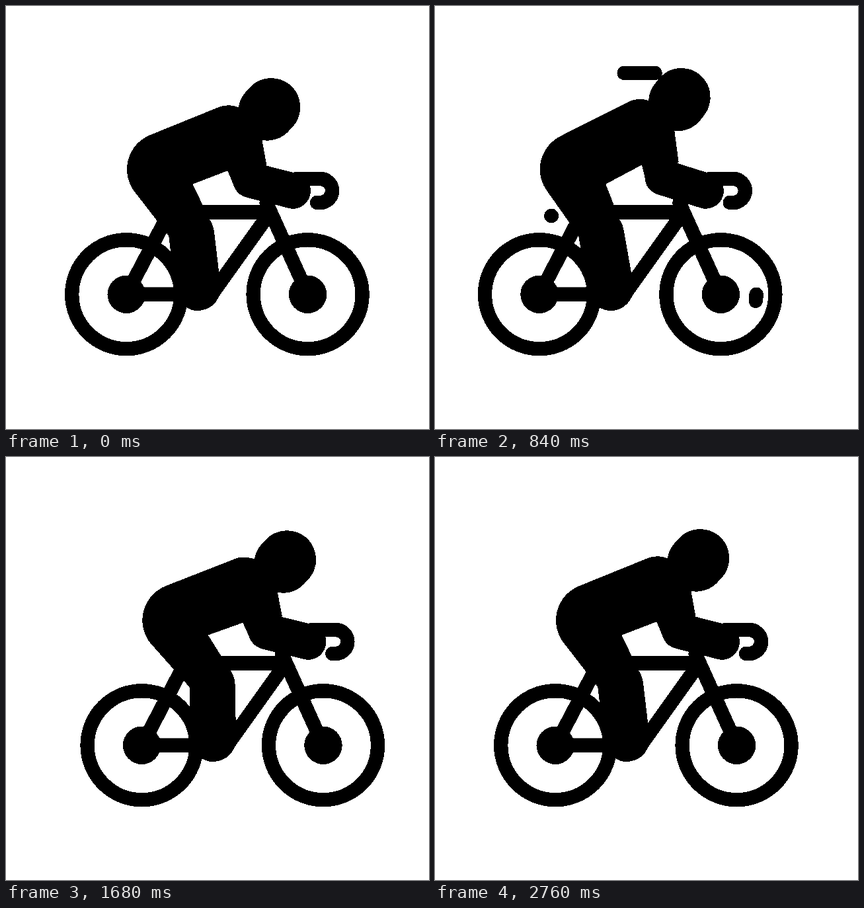
Animation of 640 by 640 pixels, one loop 3 s. Source, as an HTML page with a canvas:

```html
<!DOCTYPE html>
<html lang="en">
<head>
<meta charset="utf-8">
<title>Cyclist</title>
<style>
html, body { margin: 0; width: 100%; height: 100%; overflow: hidden; background: #fff; }
canvas { display: block; filter: contrast(40); } /* hard edges */
</style>
</head>
<body>
<canvas id="stage" width="640" height="640"></canvas>
<script>
const ctx = document.getElementById('stage').getContext('2d');
const LOOP = 3000, STEP = 40, SWEEP = 400, BAR = 21.4;
const REAR = [182.2, 436.2], FRONT = [456.6, 436.2], HIP = [239, 247], HAND = [434, 279.7];

// x: ride offset, lean: 0 upright to 1 low, knee: 0 back to 1 forward
const REST = { x: 0, lean: 0.75, knee: 0.48 };
const UP = { x: -47, lean: 0, knee: 0 };
const DOWN = { x: 35.4, lean: 1, knee: 1 };
const KEYS = [[0, REST], [565, UP], [1345, DOWN], [1505, DOWN], [2130, { ...UP, x: -31 }], [2760, REST], [LOOP, REST]];

const ease = p => (1 - Math.cos(Math.PI * Math.min(1, Math.max(0, p)))) / 2;
const mix = (a, b, p) => a + (b - a) * p;
const add = ([x, y], dx, dy) => [x + dx, y + dy];

function poseAt(t) {
  const i = KEYS.findIndex(([time]) => time > t);
  const [t0, a] = KEYS[i - 1], [t1, b] = KEYS[i];
  const p = ease((t - t0) / (t1 - t0));
  return { x: mix(a.x, b.x, p), lean: mix(a.lean, b.lean, p), knee: mix(a.knee, b.knee, p) };
}

function line(width, ...points) {
  ctx.lineWidth = width;
  ctx.beginPath();
  points.forEach(p => ctx.lineTo(...p));
  ctx.stroke();
}

function ring([x, y], radius, from = 0, to = 1) {
  ctx.lineWidth = BAR;
  ctx.beginPath();
  ctx.arc(x, y, radius, from * 2 * Math.PI, to * 2 * Math.PI);
  ctx.stroke();
}

// A streak grows from its start to its end, then its tail follows
function streak(t, headStart, tailStart, draw) {
  const head = ease((t - headStart) / SWEEP), tail = ease((t - tailStart) / SWEEP);
  if (head > 0 && tail < 1) draw(tail, head);
}

function drawWind(t) {
  const wind = (y, from, to, headStart, tailStart) => streak(t, headStart, tailStart,
    (a, b) => line(BAR, [mix(from, to, a), y], [mix(from, to, b), y]));
  wind(101.5, 333, 106, 720, 950);
  wind(146, 240.5, 102.5, 888, 1124);
  wind(276.5, 176.5, 38.5, 972, 1227);
  wind(317.5, 176.5, 38.5, 822, 1038);
}

function drawBike(t) {
  streak(t, 888, 1124, (a, b) => ring(REAR, 53.7, a, b));
  streak(t, 796, 1004, (a, b) => ring(FRONT, 53.7, a, b));
  for (const hub of [REAR, FRONT]) {
    ring(hub, 82.5);
    line(57.4, hub, hub);
  }
  line(BAR, [292, 436.2], REAR, [247.5, 312], [400, 312], [310, 438]);
  line(BAR, FRONT, [394, 298]);
  ctx.beginPath();
  ctx.moveTo(440, 261.5);
  ctx.arc(475.5, 279.5, 18, -Math.PI / 2, Math.PI / 2);
  ctx.lineTo(470.5, 297.5);
  ctx.stroke();
}

function drawRider({ lean, knee: bend }) {
  const pitch = mix(-29, -19, lean) * Math.PI / 180, stretch = mix(1.04, 0.99, lean);
  const cos = Math.cos(pitch), sin = Math.sin(pitch);
  // Along the spine from the hip, then across it
  const torso = (u, v) => add(HIP, u * stretch * cos - v * sin, u * stretch * sin + v * cos);
  const elbow = [mix(368, 371, lean), mix(257, 265.5, lean)];
  const knee = [mix(269, 293, bend), 344];

  ctx.beginPath();
  ctx.arc(...HIP, 56, 2.5, pitch + 1.5 * Math.PI);
  ctx.lineTo(...torso(112, -57));
  ctx.quadraticCurveTo(...torso(127, -57), ...torso(140, -45));
  [
    torso(181, -26), torso(154, 13),
    add(elbow, 24, -23), elbow, add(elbow, -24, 12),
    torso(88.5, 37.5), [282.5, 269.5],
    add(knee, 29, -18), knee, add(knee, -31, 8)
  ].forEach(p => ctx.lineTo(...p));
  ctx.fill();
  line(54, elbow, HAND);
  line(69, knee, [290.3, 426.5]);
  line(88, torso(177, -24), torso(185, -28));
}

function draw(t) {
  ctx.fillStyle = '#fff';
  ctx.fillRect(0, 0, 640, 640);
  ctx.fillStyle = ctx.strokeStyle = '#000';
  ctx.lineCap = ctx.lineJoin = 'round';
  const pose = poseAt(t);
  drawWind(t);
  ctx.save();
  ctx.translate(pose.x, 0);
  drawBike(t);
  drawRider(pose);
  ctx.restore();
}

function tick() {
  draw(Math.floor(performance.now() % LOOP / STEP) * STEP);
  requestAnimationFrame(tick);
}
tick();
</script>
</body>
</html>
```
